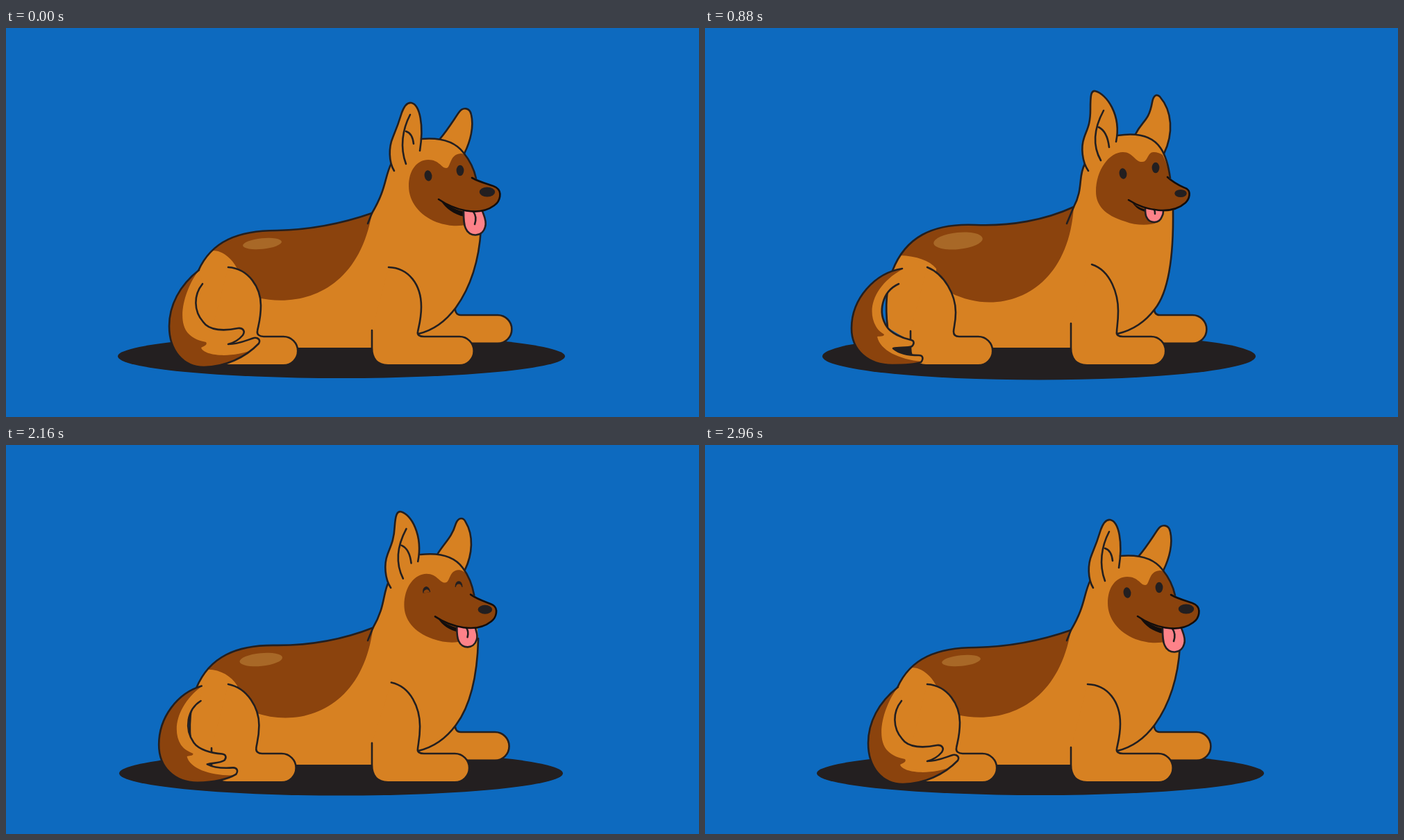
Recreate the animation shown at these times as an HTML page with a canvas. Size 998 px wide and 561 px high, loop 3320 ms.

```html
<!DOCTYPE html>
<html lang="en">
<head>
<meta charset="utf-8">
<title>Resting dog</title>
<style>
html, body { margin: 0; width: 100%; height: 100%; overflow: hidden; background: #0d6abf; }
canvas { display: block; width: 100vw; height: 100vh; }
</style>
</head>
<body>
<canvas id="stage" width="998" height="561"></canvas>
<script>
const ctx = document.getElementById('stage').getContext('2d');
const LOOP = 3320;
const BLUE = '#0d6abf', TAN = '#d78122', BROWN = '#8b430d', SHINE = '#a86827',
      INK = '#231f20', BLACK = '#120d0c', PINK = '#fd8289';

// Every part is a pair of poses: relaxed, then alert.
const back = [
  'C487 281 440 291 390 292 C335 292 296 307 277 350 C268 372 264 415 270 434',
  'C490 277 440 286 390 284 C326 281 288 303 270 350 C262 372 259 400 263 432'];
const chest = [
  'C615 436 634 422 648 403 C668 375 681 340 684 290',
  'C615 436 634 424 648 405 C668 380 675 330 674 262'];
const skull = [
  'L677 217 C674 203 668 191 659 180 C650 168 632 157 598 160',
  'L670 217 C668 202 665 186 656 173 C646 158 626 150 594 155'];
const shapes = {
  body: [
    `M527 267 ${back[0]} L296 452 V461 H594 V441 ${chest[0]} ${skull[0]} L575 165 L555 195 C545 215 548 232 527 267Z`,
    `M531 258 ${back[1]} L296 452 V461 H594 V441 ${chest[1]} ${skull[1]} L568 165 L547 196 C537 214 545 232 531 258Z`],
  back: ['M527 267' + back[0], 'M531 258' + back[1]],
  chest: ['M594 441' + chest[0], 'M594 441' + chest[1]],
  nape: ['M555 195 C545 215 548 232 527 267 L521 282', 'M547 196 C537 214 545 232 531 258 L521 282'],
  skull: ['M677 217' + skull[0], 'M670 217' + skull[1]],
  saddle: [
    'M527 267 L527 240 L290 240 L298 321 C312 321 325 332 333 347 C333 365 345 382 362 389 C430 404 508 376 527 267Z',
    'M531 258 L531 230 L270 230 L281 328 C305 329 323 335 333 347 C333 365 342 380 354 382 C425 418 523 384 531 258Z'],
  hindLeg: [
    'M320 345 C350 347 367 375 367 400 C367 420 363 430 362 437 C361 442 365 445 371 445 H399.5 A20.7 20.7 0 0 1 399.5 486.4 H318 C305 486 296 478 296 461 V437',
    'M320 345 C345 355 361 385 361 410 C361 425 358 432 358 438 C358 443 361 445 366 445 H393.5 A20.7 20.7 0 0 1 393.5 486.4 H318 C305 486 296 478 296 461 V437'],
  frontLeg: [
    'M551 345 C580 346 598 370 598 402 C598 420 594 432 593 438 C592 443 596 445 602 445 H653 A20.7 20.7 0 0 1 653 486.4 H550 C535 486 527 477 527 461 V436',
    'M557 341 C585 350 595 385 595 408 C595 425 593 432 593 438 C592 443 596 445 602 445 H642.5 A20.7 20.7 0 0 1 642.5 486.4 H550 C535 486 527 477 527 461 V426'],
  farLeg: ['M647 400 C646 408 648 414 655 414 H708 A20.4 20.4 0 0 1 708 454.8 H590 V441',
           'M647 402 C646 408 648 414 655 414 H702 A20.4 20.4 0 0 1 702 454.8 H590 V441'],
  tail: [
    'M278 349 C250 371 235 400 235 430 C235 465 255 489 285 489 C315 489 345 475 364 455 C367 450 363 446 357 447 C347 450 335 456 320 456 C328 454 336 449 341 443 C345 437 341 432 334 433 C315 437 293 437 284 424 C270 408 270 385 283 369',
    'M284 347 C245 353 211 390 211 433 C211 465 235 486 270 486 C290 486 305 484 311 482 C315 477 314 472 308 472 C297 472 280 470 271 462 C280 460 292 462 298 459 C302 455 301 451 297 450 C283 447 268 440 262 431 C248 410 255 380 279 369'],
  tailPatch: [
    'M278 349 C258 375 245 420 262 440 C270 449 280 451 288 453 C291 457 284 459 281 461 C285 473 325 477 358 463 L360 500 L200 500 L200 340Z',
    'M284 348 C245 370 232 405 246 430 C249 436 254 439 258 442 C257 446 250 444 248 445 C252 465 280 478 312 481 L312 500 L190 500 L190 340Z'],
  ear: [
    'M559 206 C551 193 551 172 557 158 C562 146 567 132 570 122 C574 111 579 107 584 108 C596 111 602 140 596 177',
    'M552 206 C543 193 541 172 546 158 C550 146 555 140 555 117 C555 96 556 90 562 91 C578 95 600 125 592 164'],
  earFold: ['M582 125 C571 146 567 172 576 196 M576 149 C583 151 586 158 587 167',
            'M574 119 C560 145 558 170 570 191 M567 143 C575 147 580 155 582 172'],
  farEar: ['M624 161 C636 147 645 132 652 122 C658 113 668 115 670 125 C674 142 669 163 660 181',
           'M620 153 C630 133 639 135 644 107 C646 96 651 95 655 99 C673 120 675 152 661 181'],
  mask: [
    'M580 228 C580 205 592 190 608 190 C624 190 627 202 634 202 C641 202 638 182 655 181 C660 181 663 184 665 187 C671 197 675 207 677 217 L671 216 C685 224 700 226 706 230 C715 236 712 250 703 256 C692 264 680 267 662 265 L664 283 C655 286 640 287 620 280 C595 270 580 250 580 228Z',
    'M563 236 C563 205 582 179 602 179 C617 179 619 194 630 193 C638 193 637 179 646 179 C651 179 656 181 659 183 C665 195 668 206 670 217 L666 215 C678 226 688 229 694 232 C700 236 698 246 692 252 C682 262 668 267 653 263 L650 281 C640 285 620 285 605 279 C575 270 563 255 563 236Z'],
  muzzle: ['M671 216 C685 224 700 226 706 230 C715 236 712 250 703 256 C680 273 645 262 623 247',
           'M666 215 C678 226 688 229 694 232 C700 236 698 246 692 252 C672 270 635 264 610 248'],
  mouth: ['M626 249 C645 262 655 264 663 265 L660 272 C645 269 634 261 626 249Z',
          'M615 251 C622 258 632 262 640 263 L638 266 C628 264 620 260 615 251Z'],
  tongue: ['M659 264 C659 275 659 283 662 289 C667 302 686 302 690 287 C693 279 688 270 686 264',
           'M634 261 C634 266 634 270 636 273 C640 282 654 283 658 272 C660 269 660 267 660 264'],
  tongueLine: ['M673 265 C677 270 677 277 675 283', 'M647 262 C648 264 648 266 648 268']
};

const mix = (a, b, p) => a + (b - a) * p;
const clamp = v => Math.min(1, Math.max(0, v));
const ease = v => (1 - Math.cos(Math.PI * clamp(v))) / 2;
const bump = (t, from, to) => Math.sin(Math.PI * clamp((t - from) / (to - from)));

// Progress towards the alert pose, then back again.
function pose(t, upEnd, downEnd, lag = 0) {
  return t < 1680 ? ease((t - lag) / (upEnd - lag))
                  : 1 - ease((t - 1680 - lag) / (downEnd - 1680 - lag));
}

// A sag bends the straight way between two poses into an arc (x, y pairs only).
function morph(name, p, sag = 0) {
  const [a, b] = shapes[name];
  const end = b.match(/[\d.]+/g);
  const low = p + sag * p * (1 - p);
  let i = 0;
  return new Path2D(a.replace(/[\d.]+/g, n => mix(+n, +end[i], i++ % 2 ? low : p)));
}

function paint(path, fill, line) {
  if (fill) { ctx.fillStyle = fill; ctx.fill(path); }
  if (line) { ctx.strokeStyle = line; ctx.stroke(path); }
}

function inside(path, draw) {
  ctx.save();
  ctx.clip(path);
  draw();
  ctx.restore();
}

function oval(a, b, p, color) {
  const [x, y, rx, ry, turn] = a.map((v, i) => mix(v, b[i], p));
  ctx.fillStyle = color;
  ctx.beginPath();
  ctx.ellipse(x, y, rx, ry, turn, 0, 7);
  ctx.fill();
}

function eye(x, y, turn, shut) {
  ctx.save();
  ctx.translate(x, y);
  ctx.rotate(turn);
  ctx.beginPath();
  ctx.rect(-9, -9, 18, mix(18, 10, shut));
  ctx.clip();
  oval([0, 0, 5.4, 7.8, 0], [0, 0, 5.4, 7.8, 0], 0, INK);
  if (shut > 0.01) oval([0, 14, 4.4, 5, 0], [0, 1.5, 4.4, 5, 0], shut, BROWN);
  ctx.restore();
}

function draw(t) {
  const head = pose(t, 480, 2520), mid = pose(t, 540, 2560), paw = pose(t, 680, 2840);
  const ear = pose(t, 900, 2960), farEar = pose(t, 600, 2700);
  const wag = pose(t, 640, 2760, 40), ground = pose(t, 840, 2400);
  const shut = Math.max(bump(t, 140, 740), bump(t, 1900, 2420));

  ctx.fillStyle = BLUE;
  ctx.fillRect(0, 0, 998, 561);
  ctx.lineWidth = 2.6;
  ctx.lineCap = ctx.lineJoin = 'round';

  oval([483, 473.5, 322, 31.5, 0], [481, 473.5, 312, 34, 0], ground, INK);
  paint(morph('farEar', farEar), TAN, INK);
  paint(morph('farLeg', paw), TAN, INK);

  const body = morph('body', head);
  paint(body, TAN);
  inside(body, () => paint(morph('saddle', head), BROWN));
  oval([369, 311, 28, 7.7, -0.1], [364.5, 307, 35.5, 12, -0.1], head, SHINE);
  for (const line of ['back', 'chest', 'nape']) paint(morph(line, head), null, INK);

  paint(morph('hindLeg', mid), TAN, INK);
  paint(morph('frontLeg', paw), TAN, INK);

  const tail = morph('tail', wag, 0.5);
  paint(tail, TAN);
  inside(tail, () => paint(morph('tailPatch', wag, 0.5), BROWN));
  paint(tail, null, INK);

  paint(morph('ear', ear), TAN, INK);
  paint(morph('earFold', ear), null, INK);

  paint(morph('mask', head), BROWN);
  eye(mix(608, 602, head), mix(213, 210, head), -0.16, shut);
  eye(mix(654, 649, head), mix(205.5, 201.5, head), 0, shut);
  oval([693, 236.5, 11.2, 7, 0], [685, 238.5, 8.7, 5.5, 0], head, INK);
  paint(morph('mouth', head), BLACK);
  paint(morph('tongue', head), PINK, INK);
  paint(morph('tongueLine', head), null, INK);
  paint(morph('muzzle', head), null, BLACK);
  paint(morph('skull', head), null, INK);
}

const start = performance.now();
function tick() {
  draw((performance.now() - start) % LOOP);
  requestAnimationFrame(tick);
}
tick();
</script>
</body>
</html>
```
